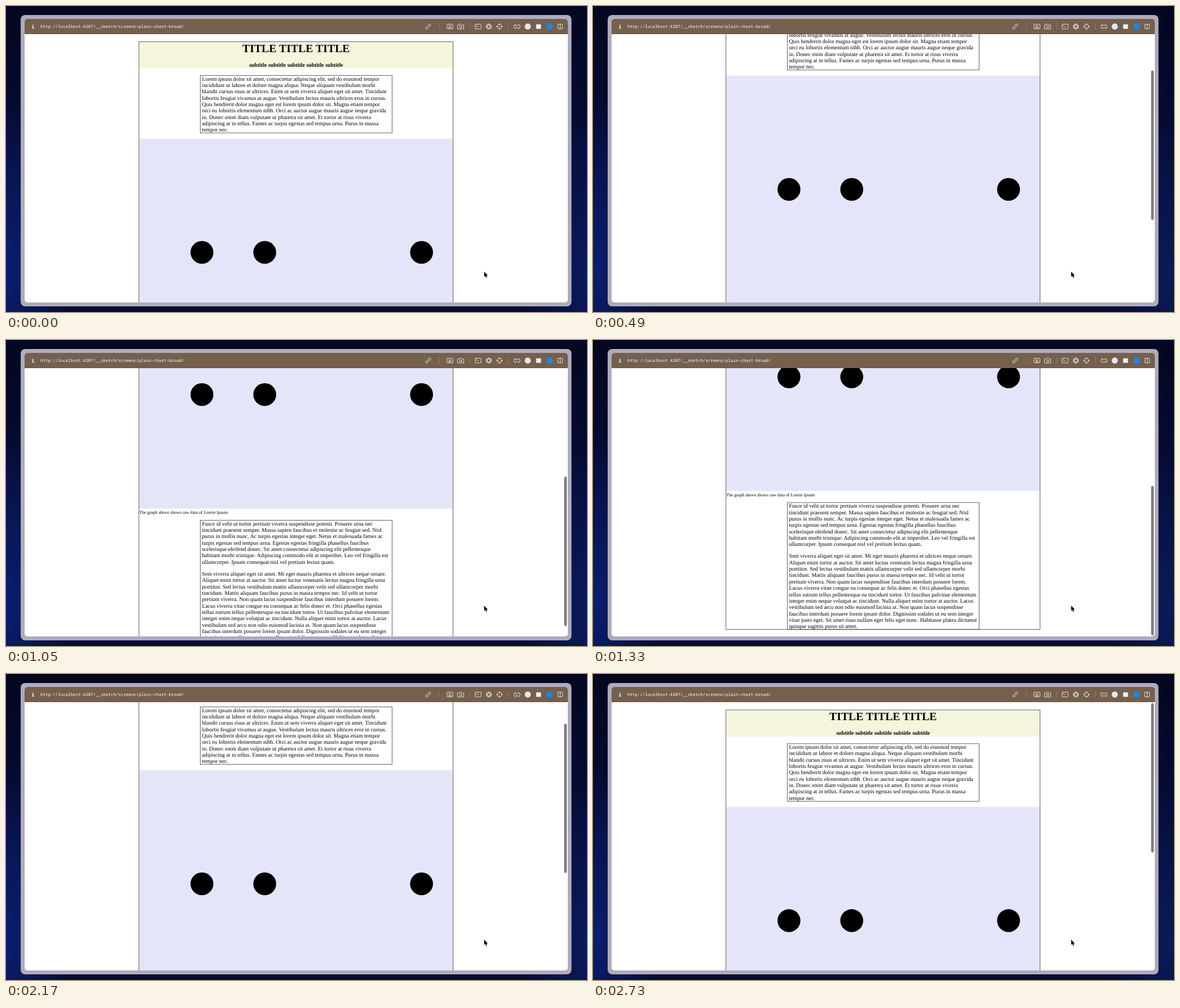
Recreate the animation shown at these times as an HTML page. Size 1030x544 px, loop 2800 ms.

```html
<!DOCTYPE html>
<html lang="en">
<head>
<meta charset="utf-8">
<title>Scrolling page</title>
<style>
@property --s { syntax: "<number>"; inherits: true; initial-value: 0; }

html, body { margin: 0; width: 100%; height: 100%; overflow: hidden; }
body {
  background:
    radial-gradient(ellipse 120px 300px at 0 86%, #0b1f6e, transparent),
    radial-gradient(ellipse 120px 280px at 100% 88%, #0a1a5c, transparent),
    linear-gradient(#030720, #060d3a 55%, #050b33);
}
svg { display: block; }
text { font-family: "Liberation Serif", "Times New Roman", serif; text-rendering: geometricPrecision; }
.copy { font-size: 9.88px; }
.mono { font-family: "Noto Sans Mono", "DejaVu Sans Mono", monospace; font-size: 7.44px; fill: #fff; }
.bold { font-weight: bold; text-anchor: middle; }
.line { fill: none; stroke: #000; stroke-width: .62; }
.icons { fill: none; stroke: #f3ece5; stroke-width: .9; stroke-linecap: round; stroke-linejoin: round; }

/* --s is the scroll offset; one picture step is 70 ms = 2.5% */
.view { animation: scroll 2800ms step-end infinite; }
.page { transform: translateY(calc(var(--s) * -1px)); }
.thumb {
  transform: translateY(calc(clamp(0, var(--s), 370) * .561px));
  animation: fade 2800ms step-end infinite;
}
@keyframes scroll {
  0% { --s: 0; }
  5% { --s: 2; }
  7.5% { --s: 9; }
  10% { --s: 25; }
  12.5% { --s: 50; }
  15% { --s: 80; }
  17.5% { --s: 112; animation-timing-function: steps(8, end); }
  37.5% { --s: 341; }
  40% { --s: 364; }
  42.5% { --s: 377; }
  45% { --s: 375.2; }
  47.5% { --s: 372.5; }
  50% { --s: 371.2; }
  52.5% { --s: 370.5; }
  55% { --s: 370; }
  70% { --s: 348; }
  72.5% { --s: 275; }
  75% { --s: 162; }
  77.5% { --s: 65; }
  80% { --s: 17; }
  82.5% { --s: -7; }
  85% { --s: -10; }
  87.5% { --s: -6.5; }
  90% { --s: -4; }
  92.5% { --s: -2.3; }
  95% { --s: -1.2; }
  97.5% { --s: -.4; }
  100% { --s: 0; }
}
@keyframes fade {
  0% { opacity: 0; }
  5% { opacity: 1; }
  60% { opacity: .7; }
  62.5% { opacity: .4; }
  65% { opacity: .15; }
  67.5% { opacity: 0; }
  70%, 100% { opacity: 1; }
}
</style>
</head>
<body>
<svg width="1030" height="544" viewBox="0 0 1030 544">
  <defs>
    <clipPath id="inner"><rect x="33" y="23" width="963" height="504" rx="5"/></clipPath>
    <clipPath id="port"><rect x="33" y="50" width="963" height="477"/></clipPath>
  </defs>

  <rect x="26" y="16" width="976.5" height="518" rx="8" fill="#aeacbc"/>
  <g clip-path="url(#inner)">
    <rect x="33" y="23" width="963" height="504" fill="#fff"/>

    <g class="view" clip-path="url(#port)">
      <g class="page">
        <rect x="236.1" y="64" width="556.5" height="46.8" fill="#f5f5dc"/>
        <text class="bold" x="514.3" y="81.6" font-size="19.77">TITLE TITLE TITLE</text>
        <text class="bold copy" x="514.3" y="108.1">subtitle subtitle subtitle subtitle subtitle</text>

        <rect class="line" x="344.3" y="123.5" width="340.2" height="102.3"/>
        <g id="intro"></g>

        <rect x="236.1" y="235.9" width="556.5" height="404.7" fill="#e5e5f9"/>
        <circle cx="347.4" cy="438" r="20.3"/>
        <circle cx="458.7" cy="438" r="20.3"/>
        <circle cx="736.7" cy="438" r="20.3"/>
        <text x="236.3" y="650" font-size="7.9">The graph above shows raw data of Lorem Ipsum</text>

        <rect class="line" x="344.3" y="661.5" width="340.2" height="225.3"/>
        <g id="body"></g>
        <rect class="line" x="235.8" y="63.6" width="556.8" height="823.2"/>
      </g>
      <rect class="thumb" x="989.4" y="51.8" width="4.8" height="265.6" rx="2.4" fill="#7e7e7e"/>
    </g>

    <rect x="33" y="23" width="963" height="27" fill="#755f4d"/>
    <rect x="33" y="49.2" width="963" height=".8" fill="#665242"/>
    <text class="mono" x="45.2" y="39.8" style="font-size:9px;font-weight:bold">i</text>
    <text class="mono" x="61" y="39.2">http://localhost:4207/__sketch/screens/plain-chart-broad/</text>

    <g class="icons">
      <g transform="translate(748.5 36.5) rotate(-45)">
        <path d="M-1 -2H-3.5a2 2 0 0 0 0 4H-1M1 -2H3.5a2 2 0 0 1 0 4H1M-2.3 0H2.3"/>
      </g>
      <path d="M768 31V42M822.5 31V42M890.5 31V42" stroke="#a08d7d" stroke-width=".7"/>
      <rect x="781.7" y="32.4" width="10.6" height="8.2" rx="1"/>
      <path d="M784 38.8H790M785 34.6L789 37.2M789 34.6L785 37.2"/>
      <path d="M800.8 33.8H803.2L804.4 32.2H807.8L809 33.8H811.4V40.8H800.8Z"/>
      <circle cx="806.1" cy="37.1" r="1.9"/>
      <rect x="831.6" y="32.3" width="10.6" height="8.4" rx="1"/>
      <path d="M833.6 34.4L834.8 35.4L833.6 36.4M836 36.6H837.4"/>
      <circle cx="856" cy="36.5" r="4.6"/>
      <path id="blade" d="M854.5 34L860 34.4M857.5 34L860 38.7M859 36.5L856 41M857.5 39L852 38.7M854.5 39L852 34.3M853 36.5L856 32"/>
      <circle cx="875" cy="36.5" r="4.1"/>
      <path d="M875 31.2V34.2M875 38.8V41.8M869.7 36.5H872.7M877.3 36.5H880.3"/>
      <path d="M901.7 33.5H904.2a1.7 1.7 0 0 0 3.4 0H910V35a1.6 1.6 0 0 1 0 3.2V39.8H907.6a1.7 1.7 0 0 0 -3.4 0H901.7V38.2a1.6 1.6 0 0 1 0 -3.2Z"/>
      <rect x="978.2" y="32.4" width="8.4" height="8.2" rx=".8"/>
      <path d="M982.4 32.4V40.6"/>
    </g>
    <circle cx="925" cy="36.5" r="5.4" fill="#dfe8f2"/>
    <rect x="939.8" y="32.6" width="8.6" height="8" fill="#f4f0ec"/>
    <circle cx="963.7" cy="36.5" r="5.6" fill="#1787f0"/>
  </g>

  <path d="M847.7 472.3V481.6L849.8 479.7L851.3 483.3L852.9 482.6L851.4 479.2H854.2Z" stroke="#fff" stroke-width="1" paint-order="stroke" stroke-linejoin="round"/>
</svg>

<script>
const intro = `Lorem ipsum dolor sit amet, consectetur adipiscing elit, sed do eiusmod tempor
incididunt ut labore et dolore magna aliqua. Neque aliquam vestibulum morbi
blandit cursus risus at ultrices. Enim ut sem viverra aliquet eget sit amet. Tincidunt
lobortis feugiat vivamus at augue. Vestibulum lectus mauris ultrices eros in cursus.
Quis hendrerit dolor magna eget est lorem ipsum dolor sit. Magna etiam tempor
orci eu lobortis elementum nibh. Orci ac auctor augue mauris augue neque gravida
in. Donec enim diam vulputate ut pharetra sit amet. Et tortor at risus viverra
adipiscing at in tellus. Fames ac turpis egestas sed tempus urna. Purus in massa
tempor nec.`;

const body = `Fusce id velit ut tortor pretium viverra suspendisse potenti. Posuere urna nec
tincidunt praesent semper. Massa sapien faucibus et molestie ac feugiat sed. Nisl
purus in mollis nunc. Ac turpis egestas integer eget. Netus et malesuada fames ac
turpis egestas sed tempus urna. Egestas egestas fringilla phasellus faucibus
scelerisque eleifend donec. Sit amet consectetur adipiscing elit pellentesque
habitant morbi tristique. Adipiscing commodo elit at imperdiet. Leo vel fringilla est
ullamcorper. Ipsum consequat nisl vel pretium lectus quam.

Sem viverra aliquet eget sit amet. Mi eget mauris pharetra et ultrices neque ornare.
Aliquet enim tortor at auctor. Sit amet luctus venenatis lectus magna fringilla urna
porttitor. Sed lectus vestibulum mattis ullamcorper velit sed ullamcorper morbi
tincidunt. Mattis aliquam faucibus purus in massa tempor nec. Id velit ut tortor
pretium viverra. Non quam lacus suspendisse faucibus interdum posuere lorem.
Lacus viverra vitae congue eu consequat ac felis donec et. Orci phasellus egestas
tellus rutrum tellus pellentesque eu tincidunt tortor. Ut faucibus pulvinar elementum
integer enim neque volutpat ac tincidunt. Nulla aliquet enim tortor at auctor. Lacus
vestibulum sed arcu non odio euismod lacinia at. Non quam lacus suspendisse
faucibus interdum posuere lorem ipsum dolor. Dignissim sodales ut eu sem integer
vitae justo eget. Sit amet risus nullam eget felis eget nunc. Habitasse platea dictumst
quisque sagittis purus sit amet.`;

const LINE = 11.34, GAP = 9.88;

function setLines(id, copy, y) {
  const box = document.getElementById(id);
  for (const row of copy.split("\n")) {
    if (!row) { y += GAP; continue; }
    const text = document.createElementNS("http://www.w3.org/2000/svg", "text");
    text.setAttribute("class", "copy");
    text.setAttribute("x", 347.4);
    text.setAttribute("y", y);
    text.textContent = row;
    box.append(text);
    y += LINE;
  }
}
setLines("intro", intro, 132.6);
setLines("body", body, 670.7);
</script>
</body>
</html>
```
